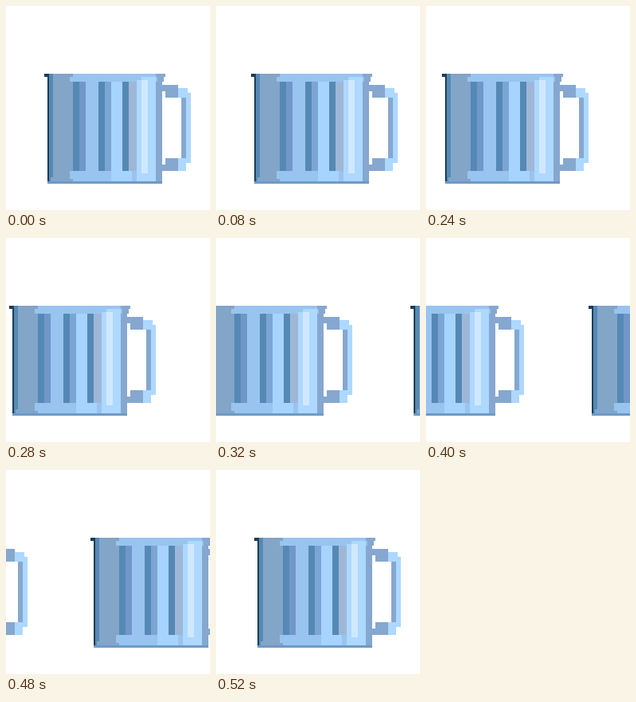
Animation of 256 by 256 pixels, one loop 560 ms. Source, as an HTML page:

```html
<!DOCTYPE html>
<html lang="en">
<head>
<meta charset="utf-8">
<title>Sliding mug</title>
<style>
  html, body { margin: 0; width: 100%; height: 100%; overflow: hidden; background: #fff; }
  svg { display: block; width: 100vw; height: 100vh; }
</style>
</head>
<body>
<svg viewBox="0 0 256 256" shape-rendering="crispEdges">
  <defs>
    <g id="mug">
      <!-- body -->
      <path fill="#82a5c8" d="M52 85H190V222H52z"/>
      <path fill="#5589b5" d="M54 85H59V215H56V222H54z"/>
      <path fill="#1d3d57" d="M48 85H54V222H52V89H48z"/>
      <path fill="#98c4ef" d="M84 85H196V221H84V217H80V207H84V95H80V89H84z"/>
      <!-- flutes -->
      <path fill="#5589b5" d="M84 95h8v112h-8zM116 95h8v112h-8zM146 95h8v112h-8z"/>
      <path fill="#7197c8" d="M92 95h8v112h-8z"/>
      <path fill="#7ca5d4" d="M124 95h8v112h-8z"/>
      <path fill="#a6d4ff" d="M132 95h14v112h12v13h-26z"/>
      <path fill="#9fb7d7" d="M154 95h10v112h-10z"/>
      <!-- highlight and right side -->
      <path fill="#add8ff" d="M164 93h6v-4h18v131h-24z"/>
      <path fill="#d0e8ff" d="M170 93h8v117h-8z"/>
      <path fill="#86a7d0" d="M188 85H200V89H198V95H196V222H188V95H190V89H188z"/>
      <path fill="#6b9bc8" d="M52 220H196V223H52z"/>
      <!-- handle -->
      <path fill="#86a7d0" d="M196 99H216V115H200V107H196zM220 115H226V191H220zM200 191H216V207H196V199H200z"/>
      <path fill="#add8ff" d="M216 103H228V109H232V197H226V207H216V191H226V115H216z"/>
    </g>
  </defs>
  <rect width="256" height="256" fill="#fff"/>
  <use id="leaving" href="#mug"/>
  <use id="arriving" href="#mug"/>
</svg>
<script>
  const STEP = 40, LOOP = 560, AWAY = 300;
  // x offset at each step
  const out = [0, -2, -4, -8, -12, -19, -28, -44, -61, -84, -109, -154, -205];
  const into = { 8: 196, 9: 177, 10: 156, 11: 110, 12: 58, 13: 0 };

  const leaving = document.getElementById('leaving');
  const arriving = document.getElementById('arriving');
  const start = performance.now();

  function place(mug, x = AWAY) {
    mug.setAttribute('x', x);
  }

  function draw() {
    const t = Math.max(0, performance.now() - start) % LOOP;
    const i = Math.floor(t / STEP);
    place(leaving, out[i]);
    place(arriving, into[i]);
    requestAnimationFrame(draw);
  }
  draw();
</script>
</body>
</html>
```
